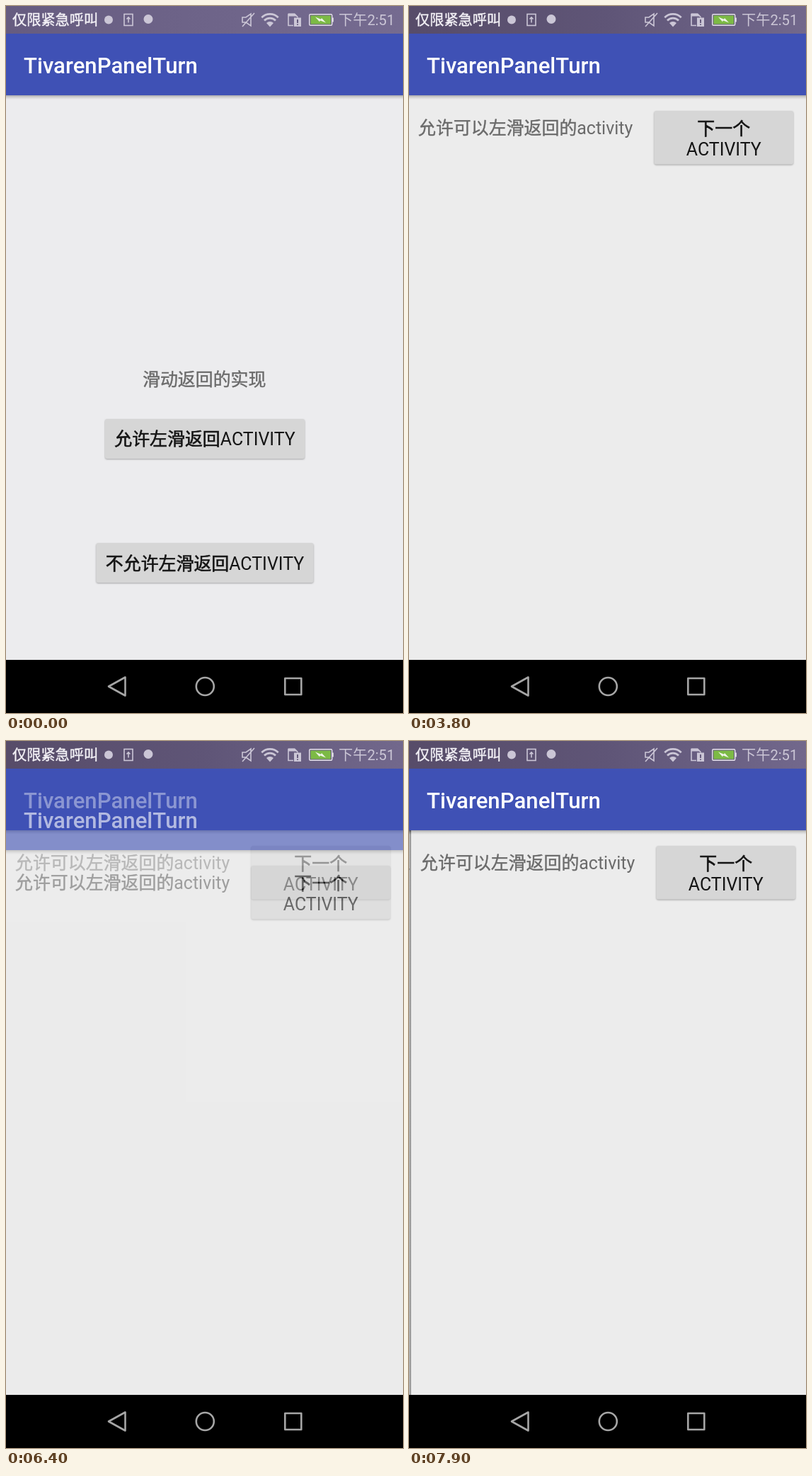
Write an HTML page that moves like this. It is 561 by 998 pixels and loops after 8000 ms.

```html
<!DOCTYPE html>
<html lang="zh-CN">
<head>
<meta charset="utf-8">
<title>Slide back demo</title>
<style>
html, body { margin: 0; width: 100%; height: 100%; overflow: hidden; background: #000; }
svg { display: block; width: 561px; height: 998px; }
text { font-family: Roboto, "Noto Sans CJK SC", "Noto Sans CJK", sans-serif; font-size: 24.93px; white-space: pre; }
.title { font-size: 31.17px; font-weight: 500; fill: #fff; }
.label { fill: #6a6a6a; }
.label .han { stroke: #6a6a6a; stroke-width: .4; }
.caption { fill: #141414; }
.caption .han { stroke: #141414; stroke-width: .6; }
.face { filter: drop-shadow(0 1.6px 1.1px rgba(0, 0, 0, .3)); }
.status text { font-size: 20.2px; }
.carrier { fill: #f4f2f7; stroke: #f4f2f7; stroke-width: .4; }
.line { fill: none; stroke: #cbc6d6; stroke-width: 1.6; }
.wide { stroke-width: 2.7; }
.solid { fill: #cbc6d6; }
.nav { fill: none; stroke: #a6a6a6; stroke-width: 2.6; stroke-linejoin: round; }
</style>
</head>
<body>
<svg viewBox="0 0 561 998">
  <defs>
    <linearGradient id="drop" x2="0" y2="1">
      <stop offset="0" stop-opacity=".28"/>
      <stop offset=".45" stop-opacity=".12"/>
      <stop offset="1" stop-opacity="0"/>
    </linearGradient>
    <linearGradient id="edge">
      <stop offset="0" stop-opacity="0"/>
      <stop offset=".5" stop-opacity=".1"/>
      <stop offset="1" stop-opacity=".4"/>
    </linearGradient>
    <linearGradient id="barLight">
      <stop offset="0" stop-color="#665c80"/>
      <stop offset=".45" stop-color="#6d6388"/>
      <stop offset="1" stop-color="#756b90"/>
    </linearGradient>
    <linearGradient id="barDark">
      <stop offset="0" stop-color="#574c69"/>
      <stop offset=".5" stop-color="#5f5577"/>
      <stop offset="1" stop-color="#72688c"/>
    </linearGradient>
  </defs>

  <g id="windows"></g>

  <g class="status">
    <rect id="statusBar" width="561" height="39"/>
    <text class="carrier" x="9" y="26.5">仅限紧急呼叫</text>
    <circle class="solid" cx="145" cy="19.5" r="6"/>
    <rect class="line" x="167" y="11.5" width="12" height="16"/>
    <path class="line" d="M173 23.5v-7M170.5 18.5l2.5-2.5 2.5 2.5"/>
    <circle class="solid" cx="201" cy="18.5" r="6.5"/>
    <path class="line" d="M334 16h5l7-5v17l-7-5h-5zM351 10l-17 19"/>
    <path class="line wide" d="M361.300 16.300a16.500 16.500 0 0 1 23.400 0M365 20.500a11 11 0 0 1 16 0"/>
    <path class="solid" d="M368 24a7 7 0 0 1 10 0l-5 5.500z"/>
    <path class="line" d="M406 27.500h-7v-16h9l4 4v1"/>
    <path class="solid" d="M399 10.500h9l4 4h-13zM407 16.500h10v12.500h-10z"/>
    <path d="M412 19v5M412 25.500v1.500" stroke="#665c7e" stroke-width="2"/>
    <rect x="428.700" y="11.700" width="32" height="15.600" rx="1.500" fill="#665c7e" stroke="#e6e3ea" stroke-width="1.400"/>
    <rect x="430.500" y="13.500" width="28.400" height="12" fill="#7cba45"/>
    <path d="M462 16.500v6" stroke="#e6e3ea" stroke-width="1.600"/>
    <path d="M437 15.500l8 3.200 1-1.700 6 6.500-8-3-1 1.700z" fill="#eef4e8"/>
    <text x="470" y="27" fill="#cbc6d6">下午2:51</text>
  </g>

  <rect y="923" width="561" height="75"/>
  <path class="nav" d="M145 960.500L168.500 947.500V973.500Z"/>
  <circle class="nav" cx="281.300" cy="960.500" r="12.500"/>
  <rect class="nav" x="394.300" y="949" width="23" height="23"/>
</svg>

<script>
const W = 561, LOOP = 8000;
const $ = id => document.getElementById(id);

// Chinese runs get a slightly heavier stroke than Latin ones.
const heavy = s => s.replace(/[\u4e00-\u9fff]+/g, run => `<tspan class="han">${run}</tspan>`);

const text = (cls, x, y, s, anchor = "start") =>
  `<text class="${cls}" x="${x}" y="${y}" text-anchor="${anchor}">${heavy(s)}</text>`;

const button = (x, y, w, h, lines) =>
  `<rect class="face" x="${x}" y="${y}" width="${w}" height="${h}" rx="3" fill="#d6d6d6"/>` +
  lines.map(([s, base]) => text("caption", x + w / 2, base, s, "middle")).join("");

const home = text("label", 193, 535.5, "滑动返回的实现") +
  button(140, 583, 282, 56, [["允许左滑返回ACTIVITY", 620]]) +
  button(127.5, 758, 307, 56, [["不允许左滑返回ACTIVITY", 795.5]]);

const detail = text("label", 13, 181, "允许可以左滑返回的activity") +
  button(346.5, 148, 196.5, 75.5, [["下一个", 181.5], ["ACTIVITY", 210.5]]);

const pane = (id, content) => `
  <g id="${id}">
    <g class="body">
      <rect x="-9" y="126" width="9" height="797" fill="url(#edge)"/>
      <rect class="back" y="126" width="${W}" height="900" fill="#ececec"/>
      ${content}
    </g>
    <rect y="39" width="${W}" height="87" fill="#3f51b5"/>
    <rect y="126" width="${W}" height="6" fill="url(#drop)"/>
    <text class="title" x="25" y="95">TivarenPanelTurn</text>
  </g>`;

$("windows").innerHTML = pane("home", home) + pane("below", detail) + pane("above", detail);
const part = (id, cls) => $(id).querySelector("." + cls);

// Each step holds until the next: time, base window, then what differs from rest.
const steps = [
  [0, "home", { light: true }],
  [3400, "home", {}],
  [3500, "home", { press: true }],
  [3600, "home", { lift: 20, alpha: .72 }],
  [3700, "home", { lift: 2, alpha: 1 }],
  [3800, "below", {}],
  [5200, "below", { press: true }],
  [5300, "below", { lift: 18, alpha: .75 }],
  [5400, "below", { lift: 2, alpha: 1 }],
  [5500, "below", {}],
  [6400, "below", { lift: 28, alpha: .6 }],
  [6500, "below", { lift: 3, alpha: 1 }],
  [6600, "below", {}],
  ...[3, 16, 38, 68, 104, 145, 385, 524, 557, 3]
    .map((x, i) => [7000 + i * 100, "below", { x, alpha: 1 }])
];

const show = (id, on) => $(id).setAttribute("visibility", on ? "visible" : "hidden");
const move = (el, x, y) => el.setAttribute("transform", `translate(${x} ${y})`);

function draw(t) {
  const [, base, { light, press, lift = 0, alpha = 0, x = 0 }] = steps.findLast(s => s[0] <= t);
  show("home", base === "home");
  show("below", base === "below");
  show("above", alpha > 0);
  $("above").setAttribute("opacity", alpha);
  move($("above"), 0, lift);
  move(part("above", "body"), x, 0);
  // The covered page trails at a third of the remaining distance.
  move(part("below", "body"), x ? (x - W) / 3 : 0, 0);
  for (const id of ["home", "below"])
    part(id, "face").setAttribute("fill", press && id === base ? "#c9c9c9" : "#d6d6d6");
  part("home", "back").setAttribute("fill", light ? "#ececee" : "#ececec");
  $("statusBar").setAttribute("fill", light ? "url(#barLight)" : "url(#barDark)");
}

const start = performance.now();
function tick() {
  draw((performance.now() - start) % LOOP);
  requestAnimationFrame(tick);
}
tick();
</script>
</body>
</html>
```
